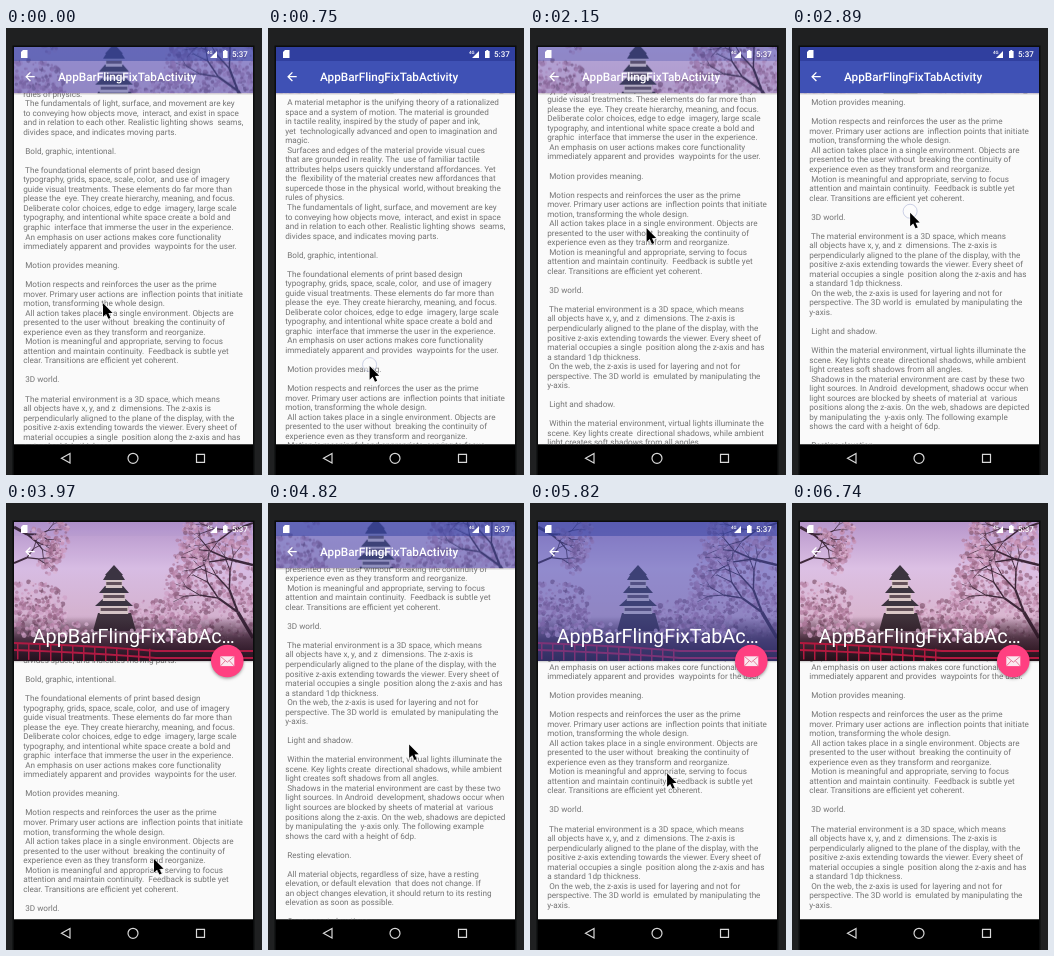
An HTML page with a canvas that plays this animation: 256x447 px, repeating every 7110 ms.

```html
<!DOCTYPE html>
<html lang="en">
<head>
<meta charset="utf-8">
<title>Collapsing toolbar</title>
<style>
html, body { margin: 0; width: 100%; height: 100%; overflow: hidden; background: #1f2021; }
canvas { display: block; width: 256px; height: 447px; }
</style>
</head>
<body>
<canvas id="stage" width="256" height="447"></canvas>
<script>
const LOOP = 7110;
const LEFT = 8, TOP = 19, WIDTH = 239, BOTTOM = 416.5;
const BAR_MIN = 65.3, BAR_MAX = 158, LINE = 9.53;
const BODY = `Material is the metaphor.

 A material metaphor is the unifying theory of a rationalized
space and a system of motion. The material is grounded
in tactile reality, inspired by the study of paper and ink,
yet  technologically advanced and open to imagination and
magic.
 Surfaces and edges of the material provide visual cues
that are grounded in reality. The  use of familiar tactile
attributes helps users quickly understand affordances. Yet
the  flexibility of the material creates new affordances that
supercede those in the physical  world, without breaking the
rules of physics.
 The fundamentals of light, surface, and movement are key
to conveying how objects move,  interact, and exist in space
and in relation to each other. Realistic lighting shows  seams,
divides space, and indicates moving parts.

 Bold, graphic, intentional.

 The foundational elements of print based design
typography, grids, space, scale, color,  and use of imagery
guide visual treatments. These elements do far more than
please the  eye. They create hierarchy, meaning, and focus.
Deliberate color choices, edge to edge  imagery, large scale
typography, and intentional white space create a bold and
graphic  interface that immerse the user in the experience.
 An emphasis on user actions makes core functionality
immediately apparent and provides  waypoints for the user.

 Motion provides meaning.

 Motion respects and reinforces the user as the prime
mover. Primary user actions are  inflection points that initiate
motion, transforming the whole design.
 All action takes place in a single environment. Objects are
presented to the user without  breaking the continuity of
experience even as they transform and reorganize.
 Motion is meaningful and appropriate, serving to focus
attention and maintain continuity.  Feedback is subtle yet
clear. Transitions are efficient yet coherent.

 3D world.

 The material environment is a 3D space, which means
all objects have x, y, and z  dimensions. The z-axis is
perpendicularly aligned to the plane of the display, with the
positive z-axis extending towards the viewer. Every sheet of
material occupies a single  position along the z-axis and has
a standard 1dp thickness.
 On the web, the z-axis is used for layering and not for
perspective. The 3D world is  emulated by manipulating the
y-axis.

 Light and shadow.

 Within the material environment, virtual lights illuminate the
scene. Key lights create  directional shadows, while ambient
light creates soft shadows from all angles.
 Shadows in the material environment are cast by these two
light sources. In Android  development, shadows occur when
light sources are blocked by sheets of material at  various
positions along the z-axis. On the web, shadows are depicted
by manipulating the  y-axis only. The following example
shows the card with a height of 6dp.

 Resting elevation.

 All material objects, regardless of size, have a resting
elevation, or default elevation  that does not change. If
an object changes elevation, it should return to its resting
elevation as soon as possible.

 Component elevations.

 The resting elevation for a component type is consistent
across apps.`.split('\n');

// Each swipe drags the pointer to (x, y), flings the text to `scroll`
// and, at `flip`, starts to collapse (up) or expand (down) the header.
const SWIPES = [
  { press: -480, flip: -480, up: true, scroll: -142.4, x: 97, y: 273 },
  { press: 490, flip: 890, up: false, scroll: 0, x: 103, y: 358 },
  { press: 1780, flip: 1780, up: true, scroll: -293, x: 118, y: 184 },
  { press: 2890, flip: 3450, up: false, scroll: -169, x: 148, y: 356 },
  { press: 4330, flip: 4330, up: true, scroll: -374.7, x: 141, y: 239 },
  { press: 5060, flip: 5580, up: false, scroll: -267.3, x: 137, y: 270 },
];
const SWIPE_MS = 680, TOUCH_MS = 350, FLING_MS = 600, FLIP_MS = 150, FADE_MS = 600;
const EXIT = { start: 5820, end: 6740, x: 200, y: 447 };

const lerp = (a, b, u) => a + (b - a) * u;
const ramp = (t, start, ms) => Math.min(1, Math.max(0, (t - start) / ms));
const easeOut = u => 1 - (1 - u) ** 3;

function poseAt(t) {
  const pose = { scroll: 0, expand: 1, fab: 1, scrim: 0, x: 97, y: 360, touching: false };
  const move = (key, to, u) => { pose[key] = lerp(pose[key], to, u); };
  for (const { press, flip, up, scroll, x, y } of SWIPES) {
    const open = up ? 0 : 1;
    const hand = easeOut(ramp(t, press, SWIPE_MS));
    const fade = ramp(t, flip + 110, FADE_MS);
    move('x', x, hand);
    move('y', y, hand);
    move('scroll', scroll, easeOut(ramp(t, press + (up ? FLIP_MS : 0), FLING_MS)));
    move('expand', open, ramp(t, flip, FLIP_MS));
    move('fab', open, ramp(t, flip + 40, FLIP_MS));
    move('scrim', 1 - open, up ? fade ** 1.6 : easeOut(fade));
    pose.touching ||= t >= press && t < press + TOUCH_MS;
  }
  const leaving = ramp(t, EXIT.start, EXIT.end - EXIT.start);
  move('x', EXIT.x, leaving);
  move('y', EXIT.y, leaving);
  return pose;
}

const ctx = document.getElementById('stage').getContext('2d');
const photo = paintPhoto();

function rect(c, color, x, y, w, h) {
  c.fillStyle = color;
  c.fillRect(x, y, w, h);
}

function disc(c, color, x, y, r) {
  c.fillStyle = color;
  c.beginPath();
  c.arc(x, y, r, 0, 7);
  c.fill();
}

function fillPath(c, color, path) {
  c.fillStyle = color;
  c.fill(new Path2D(path));
}

function strokePath(c, color, width, path) {
  c.strokeStyle = color;
  c.lineWidth = width;
  c.stroke(new Path2D(path));
}

function verticalGradient(c, top, bottom, ...colors) {
  const gradient = c.createLinearGradient(0, top, 0, bottom);
  colors.forEach((color, i) => gradient.addColorStop(i / (colors.length - 1), color));
  return gradient;
}

function paintPhoto() {
  const canvas = document.createElement('canvas');
  canvas.width = WIDTH;
  canvas.height = BAR_MAX - TOP;
  const c = canvas.getContext('2d');
  c.translate(-LEFT, -TOP);
  let seed = 11;
  const random = () => (seed = seed * 16807 % 2147483647) / 2147483647;
  const pinks = ['#d3a3c4', '#b27e9f', '#c891b4', '#845872', '#e0b9d6', '#9c6a88'];

  // Petals scattered densely towards the middle of an ellipse
  function blossoms(count, x, y, rx, ry) {
    c.globalAlpha = 0.7;
    for (let i = 0; i < count; i++) {
      const angle = random() * 7, reach = random() ** 0.6;
      disc(c, pinks[i % pinks.length], x + Math.cos(angle) * reach * rx, y + Math.sin(angle) * reach * ry, 0.8 + random() * 1.8);
    }
    c.globalAlpha = 1;
  }

  function branch(x, y, angle, length, width) {
    const endX = x + Math.cos(angle) * length, endY = y + Math.sin(angle) * length;
    strokePath(c, '#3d2738', width, `M${x} ${y}L${endX} ${endY}`);
    if (width < 0.7) return blossoms(9, endX, endY, 8, 6);
    for (const side of [-1, 1])
      branch(endX, endY, angle + side * (0.15 + random() * 0.4), length * 0.8, width * 0.65);
  }

  rect(c, verticalGradient(c, TOP, BAR_MAX, '#b796cb', '#dcc0e4', '#d9b6d0', '#8a5a74'), LEFT, TOP, WIDTH, 139);
  blossoms(330, 24, 104, 38, 26);
  blossoms(260, 150, 114, 45, 17);
  blossoms(700, 214, 88, 56, 50);
  blossoms(170, 225, 25, 50, 22);
  branch(247, 135, -2.1, 30, 3.4);
  branch(247, 62, -2.9, 25, 2.4);
  branch(247, 20, 2.8, 22, 2);
  branch(LEFT, 24, 0.5, 15, 3);
  branch(LEFT, 60, -0.4, 14, 2);

  // Castle: stone base, then tiers of wall and roof
  fillPath(c, '#40333b', 'M92 110H125L130 128H87Z');
  for (let tier = 0; tier < 3; tier++) {
    const y = 100 - tier * 13, half = 19 - tier * 4;
    rect(c, '#d9c8c6', 108 - half * 0.75, y, half * 1.5, 11);
    rect(c, '#635058', 108 - half * 0.7, y + 5, half * 1.4, 3);
    fillPath(c, '#3b343e', `M${108 - half * 0.6} ${y - 4}h${half * 1.2}L${108 + half} ${y + 3}H${108 - half}Z`);
  }
  fillPath(c, '#3b343e', 'M99 72L108 62L117 72Z');

  rect(c, verticalGradient(c, 114, BAR_MAX, 'rgba(40,18,30,0)', 'rgba(40,18,30,.75)', '#241019'), LEFT, 114, WIDTH, 44);
  blossoms(110, 45, 126, 42, 9);
  blossoms(90, 165, 128, 40, 9);
  for (const y of [140, 147])
    strokePath(c, '#b3193f', 2, `M${LEFT} ${y}Q90 ${y + 3} 150 ${y + 8}H247`);
  for (let x = 11; x < 150; x += 11) rect(c, '#b3193f', x, 140 + x / 25, 1.5, 16);
  return canvas;
}

function drawPhone() {
  rect(ctx, '#1f2021', 0, 0, 256, 447);
  rect(ctx, '#0b0c0d', 6.5, 17.5, 242, 430);
  rect(ctx, '#000', LEFT, BOTTOM, WIDTH, 31);
  strokePath(ctx, '#d8d8d8', 1.2, 'M64 425.5L55.5 430.3L64 435Z M132 430.3a5 5 0 1 0 -10 0a5 5 0 1 0 10 0 M190.5 426.3h8v8h-8Z');
}

function drawBody(barBottom, scroll) {
  rect(ctx, '#fafafa', LEFT, TOP, WIDTH, BOTTOM - TOP);
  ctx.font = '8.17px Roboto, sans-serif';
  ctx.fillStyle = '#737373';
  BODY.forEach((line, i) => {
    const y = barBottom + 18.5 + scroll + i * LINE;
    if (y > TOP && y < BOTTOM + 10) ctx.fillText(line, 17.2, y);
  });
}

function drawStatusBar() {
  fillPath(ctx, '#fff', 'M17 22H21.5V30H15V24Z M211 23V30H204Z M217 23h1.3v-1h2v1h1.3v7h-4.6Z');
  ctx.font = '500 4.5px Roboto, sans-serif';
  ctx.fillText('4G', 201, 25.5);
  ctx.font = '500 8px Roboto, sans-serif';
  ctx.fillText('5:37', 226, 29);
}

function drawBar(barBottom, expand, scrim) {
  const shadow = verticalGradient(ctx, barBottom, barBottom + 2, 'rgba(0,0,0,.2)', 'rgba(0,0,0,0)');
  rect(ctx, shadow, LEFT, barBottom, WIDTH, 2);

  ctx.save();
  ctx.beginPath();
  ctx.rect(LEFT, TOP, WIDTH, barBottom - TOP);
  ctx.clip();
  ctx.drawImage(photo, LEFT, TOP - (BAR_MAX - barBottom) / 2);
  ctx.globalAlpha = scrim;
  rect(ctx, '#3f51b5', LEFT, TOP, WIDTH, barBottom - TOP);
  rect(ctx, '#303f9f', LEFT, TOP, WIDTH, 14);
  ctx.restore();

  drawStatusBar();
  strokePath(ctx, '#fff', 1.3, 'M28.7 48.7H20.3M24.4 44.4L20.1 48.7L24.4 53');
  const weight = expand < 0.1 ? 500 : 400;
  ctx.font = `${weight} ${lerp(11.75, 19.8, expand)}px Roboto, sans-serif`;
  ctx.fillStyle = '#fff';
  const title = expand > 0.6 ? 'AppBarFlingFixTabAc…' : 'AppBarFlingFixTabActivity';
  ctx.fillText(title, lerp(52, 26.7, expand), lerp(52.6, 140, expand));
}

function drawFab(y, scale) {
  if (scale <= 0) return;
  ctx.save();
  ctx.translate(221.3, y);
  ctx.scale(scale, scale);
  ctx.shadowColor = 'rgba(0,0,0,.35)';
  ctx.shadowBlur = 3;
  ctx.shadowOffsetY = 1.5;
  disc(ctx, '#ff4081', 0, 0, 16.3);
  ctx.shadowColor = 'transparent';
  rect(ctx, '#fbe9f0', -7, -4.7, 14, 9.8);
  strokePath(ctx, '#e0708f', 0.9, 'M-7 -4.7L0 1.2L7 -4.7M-7 5.1L-2 -0.3M7 5.1L2 -0.3');
  ctx.restore();
}

function drawPointer({ x, y, touching }) {
  ctx.save();
  ctx.translate(x, y);
  if (touching) {
    disc(ctx, 'rgba(255,255,255,.45)', 0, -1.5, 7);
    ctx.strokeStyle = 'rgba(150,160,205,.6)';
    ctx.lineWidth = 0.8;
    ctx.stroke();
  }
  const arrow = 'M0 0V13.6L3.1 10.7L5.4 15.6L7.6 14.7L5.4 9.9L9.6 9.7Z';
  strokePath(ctx, 'rgba(255,255,255,.75)', 1, arrow);
  fillPath(ctx, '#000', arrow);
  ctx.restore();
}

function render(t) {
  const pose = poseAt(t);
  const barBottom = lerp(BAR_MIN, BAR_MAX, pose.expand);
  ctx.textRendering = 'geometricPrecision';
  drawPhone();
  ctx.save();
  ctx.beginPath();
  ctx.rect(LEFT, TOP, WIDTH, BOTTOM - TOP);
  ctx.clip();
  drawBody(barBottom, pose.scroll);
  drawBar(barBottom, pose.expand, pose.scrim);
  drawFab(barBottom, pose.fab);
  ctx.restore();
  if (t < EXIT.end) drawPointer(pose);
}

const began = performance.now();
function tick() {
  render((performance.now() - began) % LOOP);
  requestAnimationFrame(tick);
}
tick();
</script>
</body>
</html>
```
